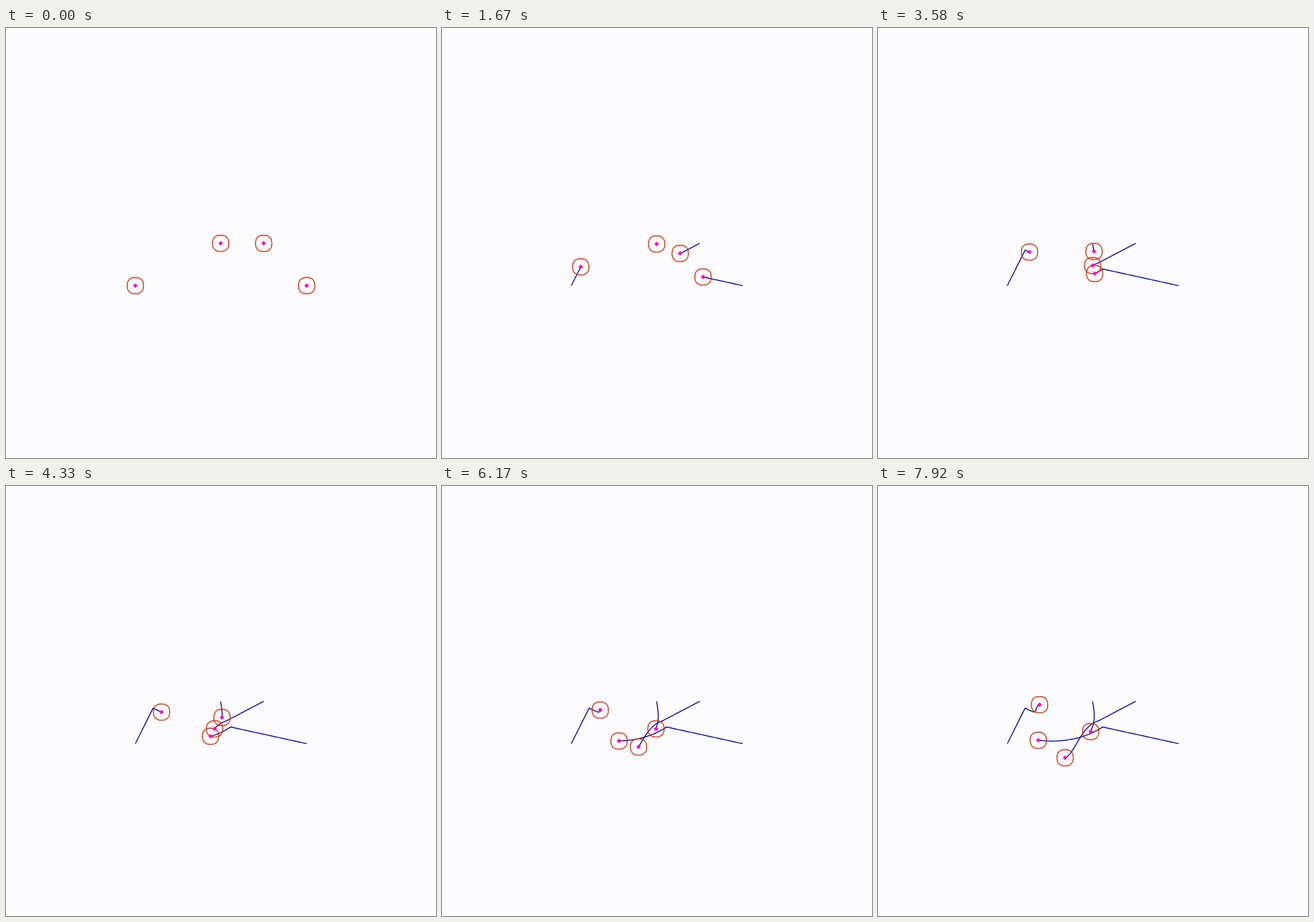
An HTML page with a canvas that plays this animation: 640 px wide and 640 px high, repeating every 8000 ms.

```html
<!DOCTYPE html>
<html lang="en">
<head>
<meta charset="utf-8">
<title>Four agents</title>
<style>
html, body { margin: 0; width: 100%; height: 100%; overflow: hidden; background: #fcfcfe; }
canvas { display: block; width: 100vw; height: 100vh; }
</style>
</head>
<body>
<canvas id="stage" width="640" height="640"></canvas>
<script>
const ctx = document.getElementById('stage').getContext('2d');
const LOOP = 8000, FIRST = 3, LAST = 95;
const START = 1.7, TURN = 36.9;

// Each agent runs straight to its turn, then follows a cubic curve.
const agents = [
  { from: [192.5, 383.5], turn: [219, 330.5], pull: [243.4, 343], ease: [229.1, 333.3], end: [240, 325.6] },
  { from: [319.5, 320.5], turn: [319.6, 322.2], pull: [326.8, 358.6], ease: [313.6, 365], end: [316.8, 365.5] },
  { from: [383.5, 320.5], turn: [327.3, 350], pull: [302.2, 356.5], ease: [291.6, 401.6], end: [278.5, 404] },
  { from: [447.5, 383.5], turn: [334.3, 358.7], pull: [297, 383.7], ease: [250.6, 380.3], end: [238.6, 378.3] }
];

const mix = (a, b, u) => a.map((v, i) => v + (b[i] - v) * u);

// De Casteljau: blend neighbours until one point is left.
function bezier(points, u) {
  while (points.length > 1) {
    points = points.slice(1).map((p, i) => mix(points[i], p, u));
  }
  return points[0];
}

function place({ from, turn, pull, ease, end }, n) {
  if (n < FIRST) return from;
  if (n < TURN) return mix(from, turn, (n - START) / (TURN - START));
  return bezier([turn, pull, ease, end], (n - TURN) / (LAST - TURN));
}

function trail(agent, n) {
  ctx.beginPath();
  ctx.moveTo(...agent.from);
  for (let k = FIRST; k <= n; k++) ctx.lineTo(...place(agent, k));
  ctx.strokeStyle = '#0c0ca4';
  ctx.lineWidth = 1.45;
  ctx.stroke();
}

function ring(x, y) {
  const r = 12.1, bend = t => Math.sign(t) * Math.abs(t) ** 0.84;
  ctx.beginPath();
  for (let i = 0; i < 72; i++) {
    const a = i * Math.PI / 36;
    ctx.lineTo(x + r * bend(Math.cos(a)), y + r * bend(Math.sin(a)));
  }
  ctx.closePath();
  ctx.strokeStyle = '#cc3410';
  ctx.lineWidth = 1.45;
  ctx.stroke();
}

function dot(x, y) {
  const r = 3.4;
  ctx.beginPath();
  ctx.moveTo(x - r, y);
  ctx.lineTo(x, y - r);
  ctx.lineTo(x + r, y);
  ctx.lineTo(x, y + r);
  ctx.fillStyle = '#fa08cc';
  ctx.fill();
}

// Twelve steps a second, switched on whole hundredths.
function stepAt(t) {
  const n = Math.floor(t * 0.012 + 0.07);
  return Math.round(n * 25 / 3) * 10 > t ? n - 1 : n;
}

function draw(now) {
  const n = Math.min(LAST, stepAt(now % LOOP));
  ctx.fillStyle = '#fcfcfe';
  ctx.fillRect(0, 0, 640, 640);
  agents.forEach(agent => trail(agent, n));
  // Markers sit on whole pixels.
  const spots = agents.map(agent => place(agent, n).map(v => Math.floor(v) + 0.5));
  spots.forEach(([x, y]) => ring(x, y));
  spots.forEach(([x, y]) => dot(x, y));
}

let begin;
function tick(now) {
  begin ??= now;
  draw(now - begin);
  requestAnimationFrame(tick);
}
draw(0);
requestAnimationFrame(tick);
</script>
</body>
</html>
```
